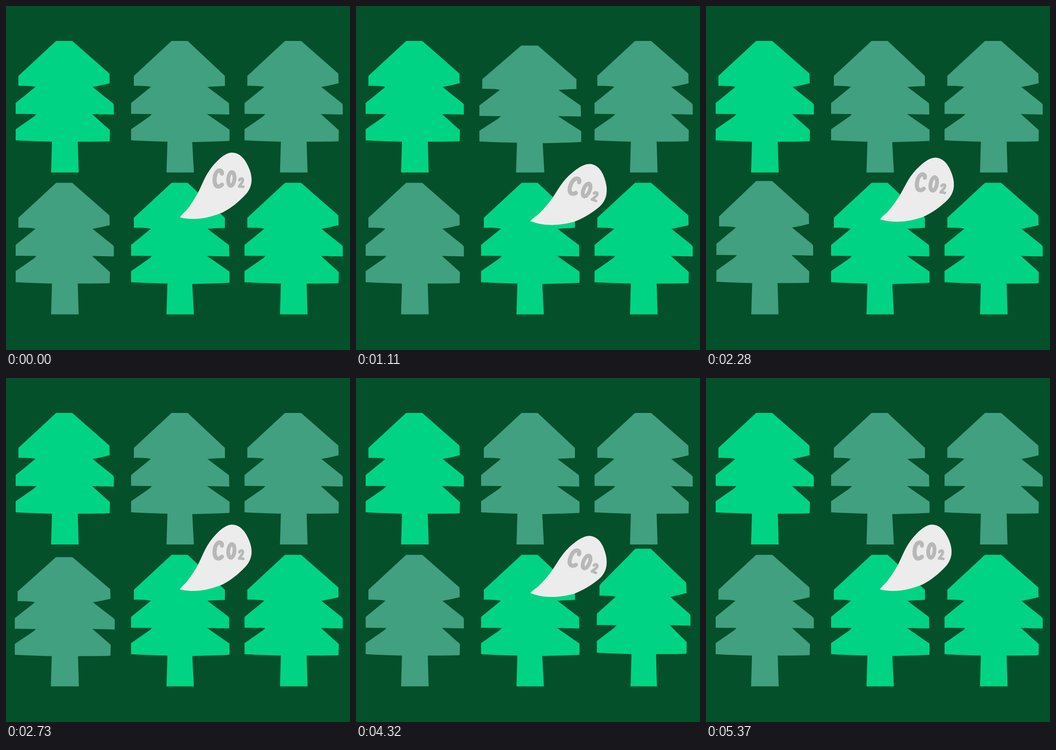
An HTML page with a canvas that plays this animation: 748 by 748 pixels, repeating every 5.4 s.

```html
<!DOCTYPE html>
<html lang="en">
<head>
<meta charset="utf-8">
<title>Trees and CO₂</title>
<style>
  html, body { margin: 0; width: 100%; height: 100%; overflow: hidden; background: #04502a; }
  canvas { display: block; width: 748px; height: 748px; }
</style>
</head>
<body>
<canvas id="stage" width="748" height="748" role="img" aria-label="CO₂"></canvas>
<script>
const ctx = document.getElementById('stage').getContext('2d');
const SIZE = 748, LOOP = 5400, STEP = 30, TURN = 1800, SWING = 2700;
const BACK = '#04502a', BRIGHT = '#00d484', DULL = '#40a080';

// Outlines in local space: x = 0 at the tree's axis, y = 0 at its foot.
const crown = 'M-19-286H16';
const left = 'L-30 0L-28-67Q-70-68-107-70V-94L-68-121Q-64-124-62-127L-107-127.5V-151' +
  'L-64-186Q-71-189-101-188.5L-101-210Z';
const sideA = 'L97-215L97.5-194Q78-189 60-186L100-154Q107-149 106.5-146V-126L59-127' +
  'L98-92L97.5-68Q88-67 28-67L30 0';
const sideB = 'L97-210V-188Q68-187 59-186L104-152Q106-151 106-149L106.5-126L58-127' +
  'L107-93V-69Q102-68 26-66L29.5 0';
const treeA = new Path2D(crown + sideA + left);
const treeB = new Path2D(crown + sideB + left);

// turn: which third of the loop the tree bounces in
const trees = [
  { x: 128, y: 362, shape: treeA, color: BRIGHT },
  { x: 379, y: 362, shape: treeB, color: DULL, turn: 0 },
  { x: 625.7, y: 362, shape: treeA, color: DULL },
  { x: 128, y: 670.5, shape: treeA, color: DULL, turn: 1 },
  { x: 379, y: 670.5, shape: treeB, color: BRIGHT },
  { x: 625.7, y: 670.5, shape: treeA, color: BRIGHT, turn: 2 }
];

const leaf = new Path2D('M378 459.5C384 451 390 447 394 442C404 429 412 416 418 405' +
  'C427 387 434 367 447 351C460 335 476 319 491 318.7C504 318.5 514 327 521 338' +
  'C528 350 534 363 534 378C534 390 529 402 520 411C506 426 490 439 471 449' +
  'C455 455 434 463 406 463C396 463 386 461.5 378 459.5Z');
const letterC = new Path2D('M469.5 364.5C470 357 464 356.5 460.5 359C453 364 452 382 455.5 388.5' +
  'C459 395 466 392.5 469.5 388.5');
const letterTwo = new Path2D('M507.5 378.5C509 374.5 515.5 373.5 515 379C514.5 384 509 388.5 507 392.5' +
  'C510 391.5 513 393 516 393');

// Stretch (+) and squash (-) over one turn
const bounce = [[60, 0], [210, -.052], [665, .051], [1050, -.037], [1470, .011], [1800, 0]];

function stretchAt(t) {
  for (let i = 1; i < bounce.length; i++) {
    const [t0, a] = bounce[i - 1], [t1, b] = bounce[i];
    if (t < t0) return a;
    if (t < t1) return a + (b - a) * (1 - Math.cos(Math.PI * (t - t0) / (t1 - t0))) / 2;
  }
  return 0;
}

// Cubic Bézier easing with control points (a, 0) and (b, 1)
function ease(x, a, b) {
  let lo = 0, hi = 1;
  for (let i = 0; i < 24; i++) {
    const s = (lo + hi) / 2, r = 1 - s;
    if (3 * a * s * r * r + 3 * b * s * s * r + s * s * s < x) lo = s; else hi = s;
  }
  return lo * lo * (3 - 2 * lo);
}

function turnAround(x, y, degrees) {
  ctx.translate(x, y);
  ctx.rotate(degrees * Math.PI / 180);
  ctx.translate(-x, -y);
}

function drawTree(tree, t) {
  const k = 'turn' in tree ? stretchAt(t - tree.turn * TURN) : 0;
  ctx.save();
  ctx.translate(tree.x, tree.y);
  ctx.scale(1 - k, 1 + k);
  ctx.fillStyle = tree.color;
  ctx.fill(tree.shape);
  ctx.restore();
}

function drawLettering() {
  ctx.strokeStyle = '#b8b8b8';
  ctx.lineCap = ctx.lineJoin = 'round';
  ctx.lineWidth = 9;
  ctx.stroke(letterC);
  ctx.lineWidth = 8.5;
  ctx.beginPath();
  ctx.ellipse(490, 376, 6.8, 14.8, .1, 0, Math.PI * 2);
  ctx.stroke();
  ctx.lineWidth = 5.8;
  ctx.stroke(letterTwo);
}

function drawLeaf(t) {
  const half = SWING / 2;
  const m = ease(1 - Math.abs(t % SWING / half - 1), .38, .2);
  ctx.save();
  ctx.translate(m, 8 * m * (1.4 - .4 * m));
  turnAround(378, 459, 8.1 * m);
  ctx.fillStyle = '#ececec';
  ctx.fill(leaf);
  turnAround(490, 376, 8.8 * m ** 1.5);
  drawLettering();
  ctx.restore();
}

function draw(now) {
  const t = Math.floor(now % LOOP / STEP) * STEP;
  ctx.fillStyle = BACK;
  ctx.fillRect(0, 0, SIZE, SIZE);
  trees.forEach(tree => drawTree(tree, t));
  drawLeaf(t);
}

let start;
function frame(now) {
  start ??= now;
  draw(Math.max(0, now - start));
  requestAnimationFrame(frame);
}
draw(0);
requestAnimationFrame(frame);
</script>
</body>
</html>
```
